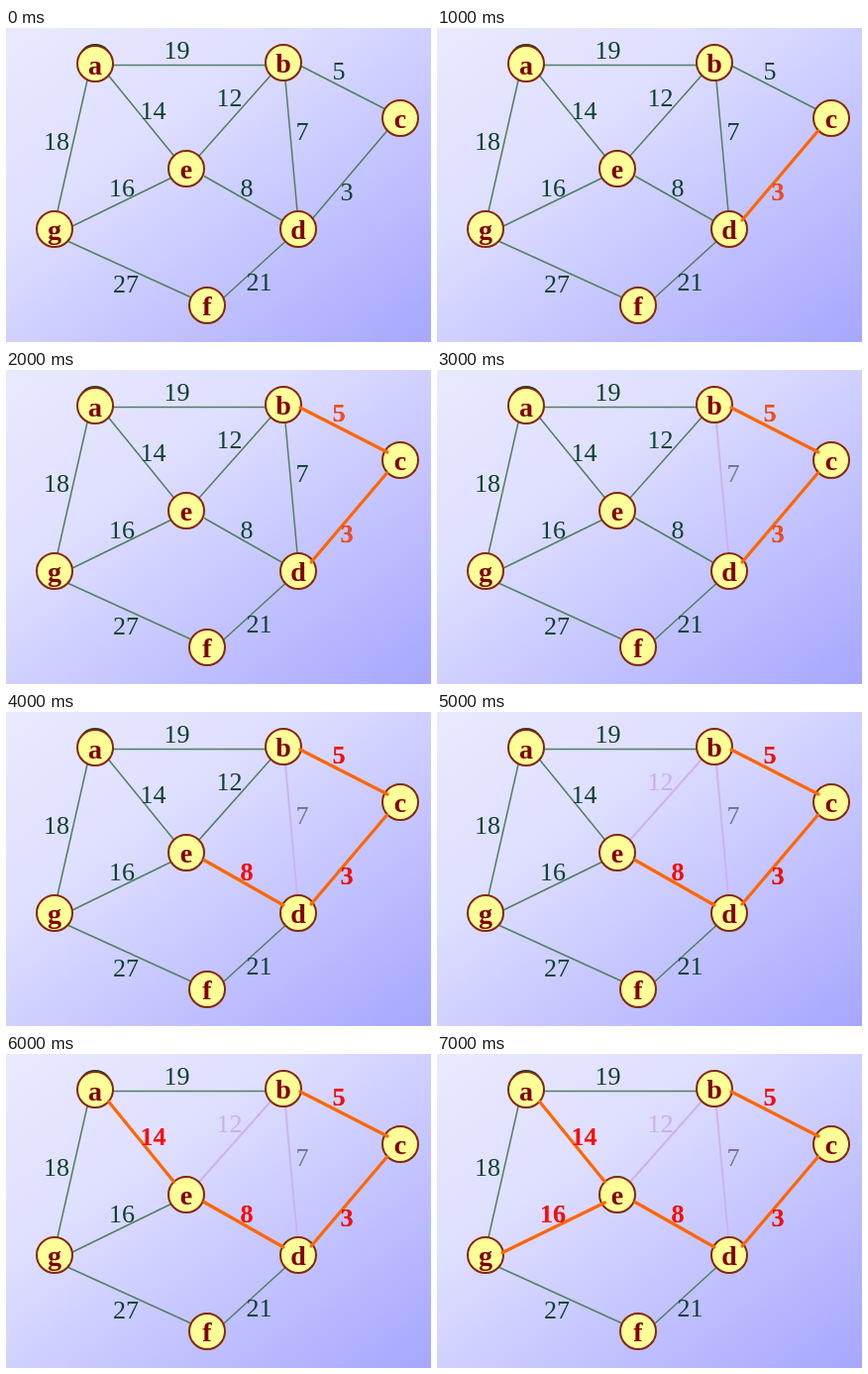
An HTML page for the animation above (8000 ms loop, 429 by 317 pixels).

```html
<!DOCTYPE html>
<html lang="en">
<head>
<meta charset="utf-8">
<title>Minimum spanning tree</title>
<style>
html, body { margin: 0; width: 100%; height: 100%; overflow: hidden; }
body { background: linear-gradient(to bottom right, #e9e9ff, #dfdfff 33%, #a6a6ff); }
svg { display: block; width: 429px; height: 317px; }
text { font-family: "Liberation Serif", "Times New Roman", serif; text-anchor: middle; }
line { stroke: #4f8060; stroke-width: 1.5; }
.label { font-size: 26px; fill: #0a4032; }
.node circle { fill: #ffff99; stroke: #85260c; stroke-width: 2; }
.node text { font-size: 28px; font-weight: bold; fill: #800000; }
.over { visibility: hidden; }
.taken line { stroke: #ff6600; stroke-width: 3.2; stroke-linecap: round; }
.taken .over { visibility: visible; fill: #ff0a0a; font-weight: bold; }
.early .taken .over { fill: #fc4a1c; }
.dropped line { stroke: #ceb2ee; stroke-width: 2; }
.dropped .label { fill: #ccaeee; }
.dropped .gray { fill: #75708f; }
</style>
</head>
<body>
<svg viewBox="0 0 429 317">
  <g id="edges"></g>
  <circle cx="90" cy="33.5" r="17.5" fill="#0a4032"/>
  <g id="nodes"></g>
  <g id="marked"></g>
</svg>
<script>
const STEP = 1000, STEPS = 8;
const svg = document.querySelector("svg");
const [edgeLayer, nodeLayer, markLayer] =
  ["edges", "nodes", "marked"].map(id => document.getElementById(id));

function add(parent, tag, attrs, text = "") {
  const el = document.createElementNS("http://www.w3.org/2000/svg", tag);
  for (const key in attrs) el.setAttribute(key, attrs[key]);
  el.textContent = text;
  return parent.appendChild(el);
}

// name: centre x, centre y, text baseline
const nodes = {
  a: [90, 36, 47], b: [280, 35, 45], c: [398, 91, 101], d: [295, 203, 213],
  e: [182, 142, 152], f: [203, 280, 290], g: [49, 203, 213]
};
for (const [name, [cx, cy, y]] of Object.entries(nodes)) {
  const g = add(nodeLayer, "g", { class: "node" });
  add(g, "circle", { cx, cy, r: 18 });
  add(g, "text", { x: cx, y }, name);
}

// weight, line ends, label position, step at which it is decided, outcome
const edges = [
  [19, 108, 37.5, 262, 37.5, 172.5, 31],
  [18, 82, 53, 52, 185, 51, 123],
  [27, 63, 215.5, 187, 272, 121, 267],
  [21, 282, 215.5, 220, 272, 255.5, 265],
  [3, 384.5, 104, 308, 194, 344, 174, 1, "taken"],
  [5, 297, 38, 385, 83, 336, 52, 2, "taken"],
  [7, 282, 53, 294, 185, 299, 113, 3, "dropped"],
  [8, 200, 149.5, 280, 195, 243, 170, 4, "taken"],
  [12, 195, 129, 267, 48, 225.5, 79, 5, "dropped"],
  [14, 103.5, 48, 169.5, 129, 148.5, 91.5, 6, "taken"],
  [16, 66, 200.5, 169.5, 150, 117, 169.5, 7, "taken"]
].map(([weight, x1, y1, x2, y2, x, y, step = Infinity, outcome]) => {
  const g = add(edgeLayer, "g", {});
  add(g, "line", { x1, y1, x2, y2 });
  add(g, "text", { x, y, class: weight === 7 ? "label gray" : "label" }, weight);
  add(g, "text", { x, y, class: "label over" }, weight);
  return { g, step, outcome };
});

let shown = -1;
function draw(now) {
  const step = Math.floor(now / STEP) % STEPS;
  if (step !== shown) {
    shown = step;
    svg.classList.toggle("early", step < 4);
    for (const edge of edges) {
      const decided = step >= edge.step;
      edge.g.setAttribute("class", decided ? edge.outcome : "");
      const layer = decided && edge.outcome === "taken" ? markLayer : edgeLayer;
      if (edge.g.parentNode !== layer) layer.appendChild(edge.g);
    }
  }
  requestAnimationFrame(() => draw(performance.now()));
}
draw(performance.now());
</script>
</body>
</html>
```
